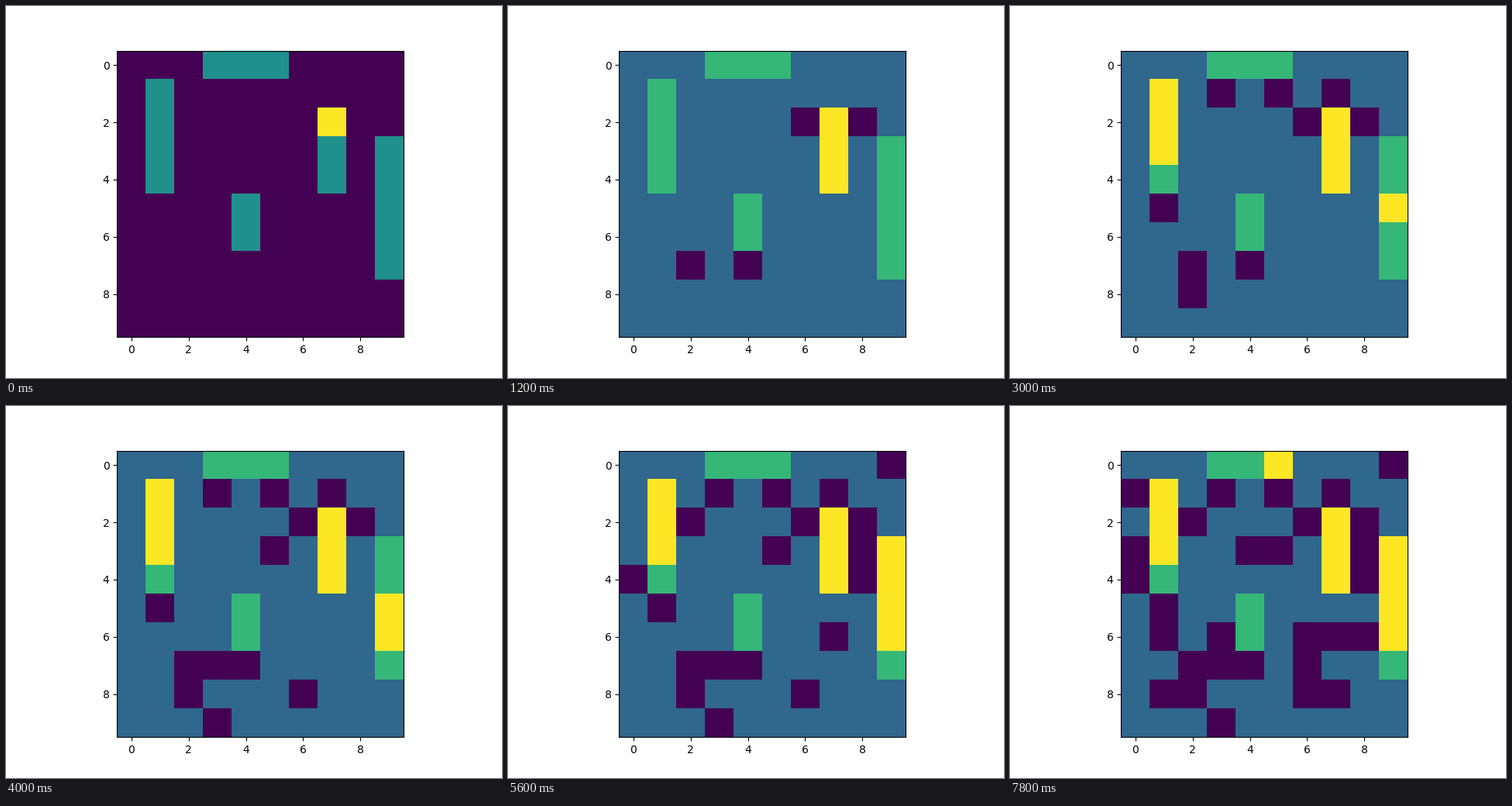
Write a matplotlib script that moves like this. It is 640 by 480 pixels and loops after 8 s.

```python
import matplotlib.pyplot as plt
import numpy as np
from matplotlib.animation import FuncAnimation

MISS, WATER, SHIP, HIT = -1, 0, 1, 2
SIZE = 10
STEP_MS = 200

# Cells are numbered row by row, so a direction is a fixed step
RIGHT, DOWN = 1, SIZE
LEFT, UP = -RIGHT, -DOWN


def run(start, step, count=2):
    return [start + step * i for i in range(count)]


fleet = np.full(SIZE * SIZE, WATER)
fleet[run(3, RIGHT, 3) + run(11, DOWN, 4) + run(27, DOWN, 3)
      + run(54, DOWN) + run(39, DOWN, 5)] = SHIP

# Single shots, and runs that sweep along a row or column
shots = [
    27, *run(72, 2 * RIGHT), *run(26, 2 * RIGHT), *run(37, DOWN),
    59, 82, 13, *run(11, DOWN, 3), *run(15, 2 * RIGHT),
    51, 69, 86, *run(93, 2 * UP), 35, *run(49, UP),
    9, *run(38, DOWN), 22, 40, *run(67, 6 * LEFT),
    10, 76, *run(34, 4 * LEFT), 68, *run(81, 6 * RIGHT),
    *run(66, 3 * LEFT), 5,
]


def board_after(count):
    board = fleet.copy()
    fired = shots[:count]
    board[fired] = np.where(fleet[fired] == SHIP, HIT, MISS)
    return board.reshape(SIZE, SIZE)


fig, ax = plt.subplots(figsize=(6.4, 4.8), dpi=100)
image = ax.imshow(board_after(1), cmap="viridis")


def update(step):
    # The colour range follows the values on the board
    image.set_data(board_after(step + 1))
    image.autoscale()
    return [image]


anim = FuncAnimation(fig, update, frames=len(shots), interval=STEP_MS,
                     repeat=True, repeat_delay=0)
plt.show()
```
